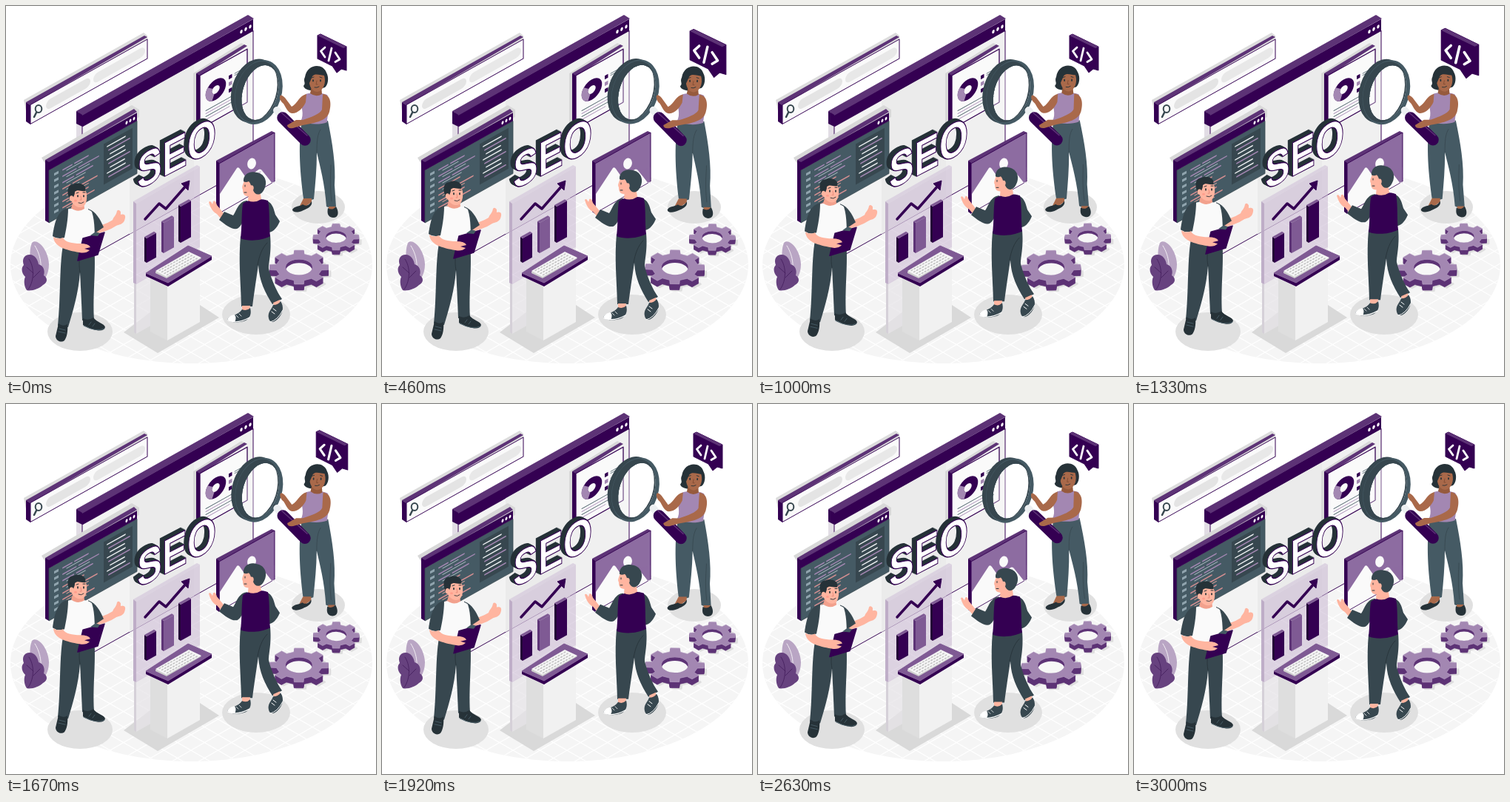
Recreate the animation shown at these times as an HTML page. Size 500x500 px, loop 3040 ms.

```html
<!DOCTYPE html>
<html lang="en">
<head>
<meta charset="utf-8">
<title>Search optimisation</title>
<style>
html, body { margin: 0; width: 100%; height: 100%; overflow: hidden; background: #fff; }
svg { display: block; width: 100%; height: 100%; }
.letters { font: bold 66px "Liberation Sans", Arial, sans-serif; }
</style>
</head>
<body>
<svg id="stage" viewBox="0 0 500 500"></svg>
<script>
const DARK = '#340052', PLUM = '#5d3376', MID = '#7f5a94', LILAC = '#a387b2';
const INK = '#263238', SLATE = '#37474f', STEEL = '#455a64';
const SHADE = '#e0e0e0', SNOW = '#fafafa';
const SKIN = '#ffb5a0', BROWN = '#a9694a';

const poly = (points, fill, extra = '') => `<polygon points="${points}" fill="${fill}" ${extra}/>`;
const path = (d, fill, extra = '') => `<path d="${d}" fill="${fill}" ${extra}/>`;
const line = (d, color, width = 1, extra = '') =>
  `<path d="${d}" fill="none" stroke="${color}" stroke-width="${width}" stroke-linecap="round" stroke-linejoin="round" ${extra}/>`;
const oval = (cx, cy, rx, ry, fill, extra = '') =>
  `<ellipse cx="${cx}" cy="${cy}" rx="${rx}" ry="${ry}" fill="${fill}" ${extra}/>`;
const rect = (x, y, w, h, fill, extra = '') =>
  `<rect x="${x}" y="${y}" width="${w}" height="${h}" fill="${fill}" ${extra}/>`;
const edge = (color = DARK, width = 1) => `stroke="${color}" stroke-width="${width}" stroke-linejoin="round"`;
// Group on the upright plane that rises to the right
const iso = (x, y, ...parts) => `<g transform="matrix(1 -.56 0 1 ${x} ${y})">${parts.join('')}</g>`;
const group = (id, ...parts) => `<g id="${id}">${parts.join('')}</g>`;
const repeat = (n, make) => Array.from({ length: n }, (_, i) => make(i)).join('');

function floor() {
  const grid = repeat(44, i => {
    const k = i * 21 - 60;
    return line(`M0 ${k}L500 ${k - 288}M0 ${k - 288}L500 ${k}`, '#fff', 1.2);
  });
  return '<clipPath id="disc"><ellipse cx="250.500" cy="350" rx="244.500" ry="133"/></clipPath>' +
    `<g clip-path="url(#disc)">${rect(0, 200, 500, 300, '#f5f5f5')}${grid}</g>`;
}

function leaves() {
  return path('M37 372C31 349 31 325 36 319C44 315 57 330 58 349C58 361 53 370 47 373Z', '#b9a5c4') +
    line('M43 372C50 357 48 338 39 324', '#fff', .8) +
    path('M28 384C24 378 24 370 26 366C21 361 20 354 24 350C21 342 25 336 32 336C39 336 43 343 44 349C51 351 53 358 51 364C57 368 56 374 50 377C45 382 34 386 28 384Z', '#67427f') +
    line('M30 383C39 370 38 352 31 342M37 361L28 353M37 367L46 358', '#47215f', .9);
}

function searchBar() {
  return poly('24,127 186,36 191,40 191,66 30,157', '#dcdcdc') +
    poly('27,130 187,40 191,42 33,134', PLUM) +
    poly('27,130 33,134 33,160 27,156', DARK) +
    iso(33, 133.500,
      rect(0, 0, 158, 26, SNOW, edge()),
      rect(21, 7, 60, 13, '#e4e4e4', 'rx="6.500"'),
      rect(85, 7, 70, 13, '#e8e8e8', 'rx="6.500"')) +
    oval(44, 139, 4.300, 5, 'none', edge(SLATE, 2)) + line('M41 144L38 150', SLATE, 2.500);
}

function browser() {
  return poly('95,152 103,156 103,344 95,339', '#e2dde5') +
    iso(103, 163,
      rect(0, 0, 231, 181, '#f3f3f3', edge()),
      rect(64, 0, 87, 181, '#ebebeb'),
      rect(151, 0, 79, 180, '#f0f0f0'),
      rect(0, -16, 231, 16, DARK),
      repeat(3, i => oval(215 + i * 6, -8, 1.700, 2.400, '#fff'))) +
    poly('95,142 327,12 335,17 103,148', PLUM) +
    poly('95,142 103,147 103,163 95,159', DARK);
}

function statsCard() {
  return poly('253,91 318,50 322,52 262,95 257,160 253,158', '#d8d8d8') +
    poly('257,91 322,52 326,54 262,95', PLUM) + poly('257,91 262,94 262,167 257,164', DARK) +
    iso(262, 94,
      rect(0, 0, 64, 72, SNOW, edge(DARK, 1.300)),
      '<circle cx="21.500" cy="31" r="9.500" fill="none" stroke="' + DARK + '" stroke-width="8.500"/>',
      line('M18 39.800A9.500 9.500 0 0 1 14 25', LILAC, 8.500, 'style="stroke-linecap:butt"'),
      repeat(3, i => rect(39, 22 + i * 9, 4.500, 5, i === 1 ? LILAC : DARK) +
        line(`M47 ${23.500 + i * 9}h11M47 ${26 + i * 9}h8`, STEEL, .7)),
      repeat(4, i => line(`M8 ${52 + i * 4}h${i === 3 ? 32 : 49}`, i % 2 ? LILAC : STEEL, .8)));
}

function codeWindow() {
  const widths = [30, 44, 36, 24, 42, 30, 38];
  const rows = widths.map((w, i) => {
    const y = 8 + i * 8.500;
    return rect(7, y, 6, 3.500, '#90a4ae') +
      line(`M19 ${y + 2}h${w * .4}M${23 + w * .4} ${y + 2}h${w * .6}`, i > 2 ? '#d58f91' : LILAC, 1.700) +
      line(`M24 ${y + 5.500}h${w * .7}`, i > 3 ? '#e8a69c' : '#b0bec5', 1);
  }).join('');
  return poly('48,205 170,134 180,140 180,150 53,213', '#d8d8d8') +
    poly('53,208 173,139 177,143 58,212', PLUM) +
    poly('53,208 58,211 58,293 53,290', DARK) +
    iso(58, 222,
      rect(0, 0, 119, 71, STEEL, edge(SLATE, .7)),
      rect(0, -11, 119, 11, DARK),
      repeat(3, i => oval(105 + i * 5, -5.500, 1.500, 2.200, '#fff')),
      rows,
      rect(74, 6, 39, 55, SLATE),
      repeat(8, i => line(`M${79 + i % 3 * 2} ${12 + i * 6}h${[24, 28, 19][i % 3]}`, i % 3 === 1 ? LILAC : '#eceff1', 1.700)));
}

function heading() {
  const word = (dx, dy, extra) =>
    `<text class="letters" transform="matrix(.77 -.4 0 1 ${177 + dx} ${249.5 + dy})" ${extra}>SEO</text>`;
  return repeat(6, i => word(i - 6, (i - 6) * .5, `fill="${INK}" stroke="${INK}" stroke-width="1.500"`)) +
    word(0, 0, `fill="#fff" stroke="${DARK}" stroke-width="1.200"`);
}

function pictureCard() {
  const sky = '#8d6ca1';
  return poly('284,209 359,169 363,171 288,213', PLUM) + poly('284,209 288,212 288,281 284,278', DARK) +
    poly('288,213 363,171 363,237 288,280', sky, edge()) +
    path('M289 254L312 219Q314 217 316 220L325 233L340 222Q343 219 346 222L362.500 243L362.500 237L289 279Z', SNOW) +
    poly('325,233 337,247 345,222 362.500,240 362.500,218 346,222', sky, 'opacity=".35"') +
    oval(332, 213, 5.800, 7.500, SNOW, 'transform="rotate(15 332 213)"');
}

function bar(x, y, w, h, face, side) {
  return iso(x, y, rect(0, 0, w, h, face)) +
    poly(`${x - 3},${y - 2} ${x},${y} ${x},${y + h} ${x - 3},${y + h - 2}`, side) +
    poly(`${x - 3},${y - 2} ${x + w - 3},${y - 2 - w * .56} ${x + w},${y - w * .56} ${x},${y}`, MID);
}

function stand() {
  const keys = repeat(4, r => repeat(11, c => {
    const x = 207 + c * 3.900 + r * 3.500, y = 357.500 - c * 2.150 + r * 2;
    return line(`M${x} ${y}l1.600 -.9`, '#bdbdbd', 1.400);
  }));
  return poly('159,441 205,469 288,421 262,404 218,396', '#d9d9d9') +
    poly('173,374 176,376 176,443 173,441', '#d5d0d8') +
    poly('176,375 262,326 262,394 176,443', '#e7e5e8', 'opacity=".75"') +
    poly('195,368 218,379 218,452 195,440', '#dedede') +
    poly('218,379 262,352 262,427 218,452', '#f1f1f1') +
    poly('172,264 258,215 262,217 176,267', '#d8ccde', 'opacity=".8"') +
    poly('172,264 176,267 176,376 172,374', '#b9a6c3', 'opacity=".9"') +
    poly('176,267 262,217 262,326 176,376', '#c8b7d1', 'opacity=".55"') +
    line('M188 288L207 267L216 274L244 242', DARK, 3.500) + poly('237,240 248,236 246,249', DARK, edge(DARK, 1)) +
    bar(190, 314, 13, 33, DARK, '#220036') +
    bar(213, 293, 14, 41, MID, PLUM) +
    bar(236, 271, 14, 49, DARK, '#220036') +
    poly('189,361 219,374 278,338 278,343 219,379 189,365', DARK) +
    poly('189,361 246,324 278,338 219,374', MID, edge(MID)) +
    poly('202,359 247,333 264,341 217,368 202,361', '#cfcfcf') +
    poly('202,358 247,332 264,340 217,366', '#f5f5f5') + keys;
}

function gear(cx, cy, rx, depth) {
  const teeth = 8, ry = rx * .58, points = [];
  for (let i = 0; i < teeth; i++)
    [[-.28, .78], [-.2, 1], [.2, 1], [.28, .78]].forEach(([offset, r]) => {
      const a = (i + offset) * 2 * Math.PI / teeth;
      points.push([cx + Math.cos(a) * rx * r, cy + Math.sin(a) * ry * r]);
    });
  const shift = dy => points.map(([x, y]) => `${x.toFixed(1)},${(y + dy).toFixed(1)}`).join(' ');
  const id = `hole${rx}`, hx = rx * .45, hy = ry * .45;
  return `<g transform="translate(3 1)">${poly(shift(depth), '#dedede', edge('#dedede', 2))}</g>` +
    repeat(depth, i => poly(shift(depth - i), PLUM, edge(PLUM, .7))) +
    poly(shift(0), LILAC, edge('#b7a0c3', .7)) +
    `<clipPath id="${id}">${oval(cx, cy, hx, hy, '#000')}</clipPath>` +
    `<g clip-path="url(#${id})">${oval(cx, cy, hx, hy, PLUM)}${oval(cx, cy + depth * .6, hx, hy, '#f7f7f7')}</g>`;
}

function pointingMan() {
  return path('M317 311C330 316 345 316 357 310C359 333 355 345 355 355C359 371 366 386 373 396L360 403C350 387 342 371 341 350C338 370 335 390 333 406L318 406C317 370 314 345 317 311Z', SLATE) +
    line('M340 350C342 338 346 327 353 320', INK, .8) +
    poly('319,405 330,405 329,412 319,413', SKIN) + poly('361,401 370,397 371,403 363,407', SKIN) +
    path('M319 410Q325 413 330 408C332 416 330 421 324 425C316 428 304 429 299 423C305 417 314 418 319 410Z', SLATE) +
    path('M299 423Q304 417 309 417Q312 422 309 427Q302 427 299 423Z', '#fff') +
    line('M300 425Q313 430 329 421', '#fff', 1.200) +
    line('M311 418l3 3M315 416l3 3', '#fff', .8) +
    path('M355 422C353 414 359 410 361 404Q368 404 371 399C376 406 375 416 366 424C360 429 356 427 355 422Z', SLATE) +
    line('M357 427Q367 425 374 411M361 409l4 3M359 413l4 3', '#fff', 1) +
    line('M295 287L284 274', SKIN, 7.500) +
    path('M289 282C280 281 276 272 274 265Q276 262 279 268L280 264Q283 262 285 269L292 278Z', SKIN) +
    path('M326 263C314 264 312 276 307 283L295 278L288 289C298 297 308 304 314 300C321 294 325 280 329 272Z', SLATE) +
    path('M345 262C358 262 361 270 364 282L370 291C365 303 358 307 352 306L347 287Z', SLATE) +
    path('M320 267C328 261 344 259 354 263C357 280 355 296 357 311C344 318 326 318 317 314C319 298 318 281 320 267Z', DARK) +
    path('M328 251L343 248L345 261Q336 267 327 263Z', SKIN) +
    path('M322 236C320 242 318 245 320 248C320 255 323 258 330 257L340 251L337 234Z', SKIN) +
    path('M321 237C320 228 329 222 339 225C351 227 355 240 347 251C342 257 336 255 334 249C331 247 332 241 328 237Q324 239 321 237Z', SLATE) +
    oval(332, 246, 2.700, 3.700, SKIN) + line('M323 242v2M322 252l3 0', INK, 1);
}

function clipboardMan() {
  return path('M77 324L119 322C122 358 117 385 119 424L103 425C102 401 101 378 100 360C98 387 91 411 84 434L70 432C74 395 72 350 77 324Z', SLATE) +
    line('M100 360C98 348 99 341 102 335', INK, .8) +
    path('M71 429Q77 434 83 430C84 440 82 448 79 452C74 456 67 452 67 446Z', INK) +
    path('M104 422Q111 426 118 421C123 428 133 429 134 434C132 441 121 440 104 431Z', INK) +
    line('M72 436l8 2M71 440l9 2M115 427l-3 4M120 429l-3 4', STEEL, 1) +
    line('M105 432Q122 441 133 436', STEEL, 1) +
    line('M122 303C134 300 146 295 153 288', SKIN, 9.500) +
    path('M144 291C144 285 149 284 150 277Q152 274 155 278L155 282C162 280 162 285 160 290C158 295 151 297 147 296Z', SKIN) +
    path('M111 274C122 278 127 288 132 299L120 307L111 291Z', SLATE) +
    path('M82 275C90 272 110 272 116 278C121 293 119 310 121 324C107 331 88 331 77 326C80 310 78 291 82 275Z', SNOW) +
    path('M84 273C70 276 66 290 63 311Q70 316 79 313C81 303 84 289 84 273Z', SLATE) +
    poly('104,314 133,306 124,336 97,344', DARK, edge(DARK, 1.500)) +
    poly('114,310 121,305 127,307 124,311', STEEL) +
    path('M64 312Q70 316 77 313C79 319 90 321 100 321Q112 321 114 326L106 328L113 330Q108 335 99 333C82 330 65 326 64 312Z', SKIN) +
    path('M91 264L105 266L106 274Q97 280 88 273Z', '#f2a18d') +
    path('M89 249C95 243 108 245 109 254C110 264 107 271 102 272C95 273 90 268 88 262Z', SKIN) +
    path('M87 262C81 252 83 241 91 241C99 237 110 242 107 250C101 251 97 247 93 251C93 256 91 257 90 262Z', INK) +
    oval(88.500, 260, 2.700, 3.700, SKIN) +
    line('M97 256v1.500M105 256v1.500', INK, 1.700) + line('M95 253l3-1M104 252l3 0', INK, 1) +
    line('M101 257l1 5l-2 0', '#e58a78', .9) + line('M98 266Q102 268 105 265', INK, .9) +
    oval(94, 263, 2, 1.500, '#ff8f80', 'opacity=".6"');
}

function magnifier() {
  const ring = (cx, rx, ry) => `M${cx - rx} 116a${rx} ${ry} 0 1 0 ${2 * rx} 0a${rx} ${ry} 0 1 0 ${-2 * rx} 0Z`;
  const hole = ring(343.500, 23.500, 38);
  const tilt = 'transform="rotate(17 340 116)" fill-rule="evenodd"';
  return path(hole, '#fff', tilt + ' opacity=".35"') +
    path(ring(335, 30, 44) + hole, SLATE, tilt) +
    path(ring(341.500, 31, 44.500) + hole, STEEL, tilt) +
    path(ring(339, 28, 42) + hole, SLATE, tilt) +
    line('M363 138L373 149', SLATE, 5) + line('M366 141L373 149', '#eceff1', 10) +
    line('M374 151L404 181', DARK, 15.500) + line('M372 144L407 175', PLUM, 1.500);
}

function magnifierWoman() {
  return path('M400 153C411 158 424 159 435 155C441 185 446 215 444 242L446 271Q440 275 433 271C431 240 424 215 420 198C420 220 418 240 416 261Q408 264 402 260C398 230 394 190 400 153Z', STEEL) +
    line('M420 198C420 182 421 173 425 167M439 215C439 225 437 240 440 264', SLATE, .8) +
    path('M402 260L413 260L413 265L403 272L396 272Z', BROWN) + path('M436 271h9l2 6h-11Z', BROWN) +
    path('M401 268C405 271 409 270 413 264C415 271 406 274 402 276C394 280 387 279 387 275C390 270 397 271 401 268Z', INK) +
    path('M435 273Q441 277 446 271C450 278 450 286 442 286C434 285 434 279 435 273Z', INK) +
    path('M405 119C414 116 427 117 434 120C441 133 434 145 434 157C424 161 409 160 398 156C404 146 398 136 399 127Z', LILAC) +
    magnifier() +
    path('M406 119C396 121 394 132 386 136L377 124Q371 118 370 122Q369 127 375 132C379 139 382 145 387 145C395 145 402 137 405 130Z', BROWN) +
    path('M428 119C439 120 440 132 437 143C434 153 425 157 401 161L388 165Q380 166 380 161L392 154L401 154C413 150 424 146 427 140Z', BROWN) +
    path('M404 96C407 77 429 77 433 90C437 97 435 107 431 110L424 112C416 116 403 114 402 108C406 104 401 102 404 96Z', INK) +
    path('M413 108L426 108L427 119Q419 124 411 118Z', '#965a3d') +
    path('M410 94C415 89 425 88 430 94C433 104 429 114 421 116C412 116 408 105 410 94Z', BROWN) +
    path('M407 98C408 83 425 79 433 94C424 94 418 90 414 95L410 104L406 108Z', INK) +
    line('M415 100v1.500M425 100v1.500', INK, 1.700) + line('M413 97l3-1M424 96l3 1', INK, .9) +
    line('M420 101l-1 5l2 0', '#7d4930', .8) + line('M417 110Q420 111 423 109', INK, .9);
}

function badge() {
  return poly('421,40 425,38 460,55 460,87 453,85 447,90 441,81 421,71', DARK, edge(DARK, 1)) +
    poly('421,40 425,38 460,55 456,57', PLUM) +
    line('M431 56L425.500 61L431 69M445 63L451 72L445 75.500', '#fff', 2.800) +
    line('M440 57L436 74', '#fff', 2.800);
}

const stage = document.getElementById('stage');
stage.innerHTML = [
  floor(), leaves(),
  oval(100, 440, 44, 26, SHADE), oval(338, 417, 46, 27, SHADE), oval(422, 272, 36, 22, SHADE),
  searchBar(), browser(), statsCard(), codeWindow(), pictureCard(), stand(), heading(),
  group('gears', gear(396, 353, 40, 8), gear(446, 312, 31, 6)),
  group('pointer', pointingMan()),
  group('woman', magnifierWoman()),
  group('clipper', clipboardMan()),
  group('badge', badge())
].join('');

const LOOP = 3040, CYCLE = 3000;
const beat = [[0, 1], [.12, 1.310], [.28, 1], [.35, 1], [.45, 1.310], [.6, 1], [1, 1]];
const sway = [[0, 0], [.25, 1], [.75, -1], [1, 0]];
const bob = [[0, 0], [.5, -10], [1, 0]];

function sample(keys, p) {
  const i = Math.max(1, keys.findIndex(([at]) => at >= p));
  const [a, from] = keys[i - 1], [b, to] = keys[i];
  return from + (to - from) * (p - a) / (b - a);
}

const move = (id, transform) => document.getElementById(id).setAttribute('transform', transform);

function draw(time) {
  const p = Math.min(1, time % LOOP / CYCLE);
  const lift = sample(bob, p), angle = sample(sway, p * 2 % 1), size = sample(beat, p);
  move('pointer', `translate(0 ${lift})`);
  move('clipper', `translate(0 ${lift})`);
  move('woman', `rotate(${angle} 376 179)`);
  move('gears', `rotate(${angle} 417 339)`);
  move('badge', `translate(440.5 64.5) scale(${size}) translate(-440.5 -64.5)`);
}

const start = performance.now();
function tick() {
  draw(performance.now() - start);
  requestAnimationFrame(tick);
}
tick();
</script>
</body>
</html>
```
